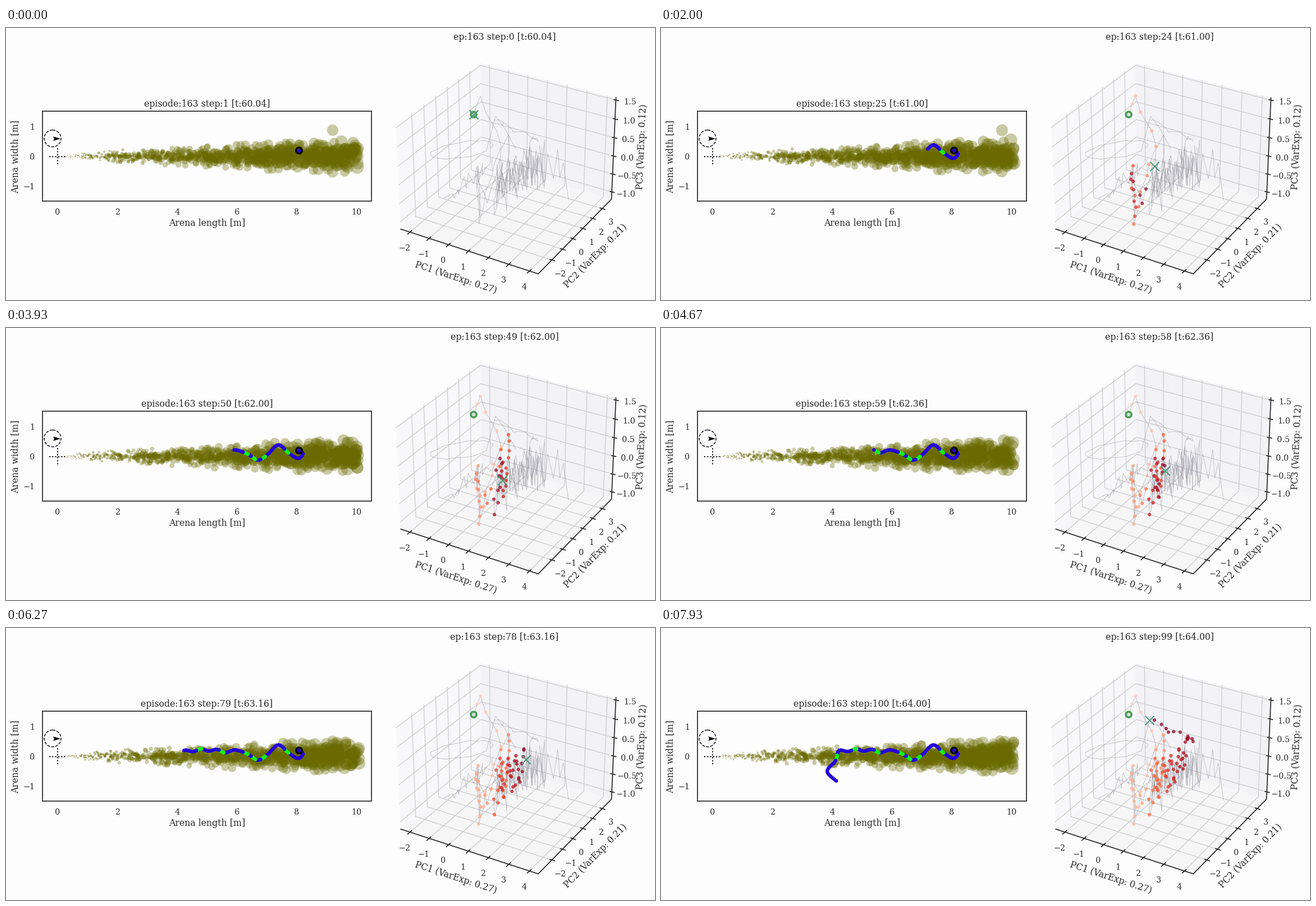
Recreate the animation shown at these times as a matplotlib script. Size 1156 by 484 pixels, loop 8 s.

```python
import math

import numpy as np
import matplotlib.pyplot as plt
from matplotlib.animation import FuncAnimation
from matplotlib.colors import LinearSegmentedColormap
from matplotlib.patches import Circle, Polygon, Rectangle

W, H, DPI = 1156, 484, 100
FRAMES, INTERVAL = 160, 50
PT = 72 / DPI
INK = "#262626"
LABEL, TICK = 15.7, 14.3
UNIT = 53.3                      # pixels per metre in the arena
ORIGIN = np.array([91.5, 228.4])
WIND = 0.5
STEPS = np.arange(100)

plt.rcParams["font.family"] = "DejaVu Serif"
rng = np.random.default_rng(163)
fig = plt.figure(figsize=(W / DPI, H / DPI), dpi=DPI, facecolor="#fdfdfd")
ax = fig.add_axes([0, 0, 1, 1])
ax.set_xlim(0, W)
ax.set_ylim(H, 0)
ax.axis("off")


def text(x, y, s, size=LABEL, **kw):
    kw = {"ha": "center", "va": "center", "color": INK, **kw}
    return ax.text(x, y, s, fontsize=size * PT, **kw)


def number(x, y, s, **kw):
    return text(x, y, str(s).replace("-", "\u2212"), TICK, va="center_baseline", **kw)


def line(points, color=INK, width=1.7, **kw):
    return ax.plot(*np.transpose(points), color=color, lw=width * PT, **kw)[0]


def area(radius):
    """Scatter size of a disc with the given pixel radius."""
    return (2 * np.asarray(radius) * PT) ** 2


# ---- arena ---------------------------------------------------------------
ax.add_patch(Rectangle((64.7, 148.2), 11 * UNIT, 3 * UNIT, fill=False,
                       ec=INK, lw=1.7 * PT, zorder=8))
for v in range(0, 11, 2):
    number(ORIGIN[0] + v * UNIT, 327, v)
for v in (-1, 0, 1):
    number(51.5, ORIGIN[1] - v * UNIT, v, ha="right")
text(358, 347, "Arena length [m]")
text(17, 228.5, "Arena width [m]", rotation=90)
arena_title = text(358, 135.5, "")

line([(76.5, 229), (107, 229)], "black", 2, ls=":", zorder=7)
line([(91.5, 214), (91.5, 246)], "black", 2, ls=":", zorder=7)
ax.add_patch(Circle((83, 196.5), 15, fill=False, ec="#05051e", lw=1.4 * PT, ls="--", zorder=7))
ax.add_patch(Polygon([(84, 193), (97, 197), (84, 201), (86, 197)], fc="black", zorder=7))

# ---- odour puffs ---------------------------------------------------------
N = 1080
puff_x = np.append(rng.uniform(-2.1, 10.05, N), 9.2)
puff_z = np.append(rng.normal(0, 1, N).clip(-2.4, 2.4), -4.1)   # last one strays
puff_size = rng.uniform(0.8, 1.12, N + 1)
puff_phase = rng.uniform(0, 2 * math.pi, N + 1)
plume = ax.scatter([], [], color="#6a6a00", alpha=0.35, linewidths=0, zorder=2)


def draw_plume(elapsed):
    x = puff_x + WIND * elapsed
    seen = (x > 0.02) & (x < 10.08)
    x = x[seen]
    wobble = 0.15 * np.sin(puff_phase[seen] + 1.5 * elapsed)
    y = 2.9 * x ** 0.6 * (puff_z[seen] + wobble)
    plume.set_offsets(np.column_stack([ORIGIN[0] + x * UNIT, ORIGIN[1] + y]))
    plume.set_sizes(area(1.6 * x ** 0.83 * puff_size[seen]))


# ---- flight path ---------------------------------------------------------
def smooth(keys, per_span=12):
    """Catmull-Rom curve through the key points."""
    p = np.array([keys[0], *keys, keys[-1]], float)
    t = np.linspace(0, 1, per_span, endpoint=False)[:, None]
    spans = [b + t / 2 * (c - a + t * (2 * a - 5 * b + 4 * c - d + t * (3 * (b - c) + d - a)))
             for a, b, c, d in zip(p, p[1:], p[2:], p[3:])]
    return np.vstack([*spans, p[-1:]])


def even_steps(curve):
    """Resample a curve at constant speed, one point per step."""
    arc = np.append(0, np.cumsum(np.hypot(*np.diff(curve, axis=0).T)))
    at = arc[-1] * STEPS / STEPS[-1]
    return np.column_stack([np.interp(at, arc, c) for c in curve.T])


flight = even_steps(smooth([
    (522, 218), (529, 224), (520, 232), (503, 222), (485, 208), (466, 225), (449, 235),
    (430, 224), (408, 217), (390, 222), (376, 216), (361, 219), (347, 215), (333, 220),
    (317, 218), (311, 236), (296, 255), (312, 272)]))
whiffs = np.array([14, 31, 37, 42, 56, 69, 82])
on_scent = np.abs(STEPS[:, None] - whiffs).min(axis=1) <= 1
flight_colors = np.where(on_scent, "#0cf51a", "#2400d8")
trail = ax.scatter([], [], s=area(3.3), linewidths=0, zorder=5)
ax.add_patch(Circle(flight[0], 5.2, fill=False, ec="black", lw=3.5 * PT, zorder=6))

# ---- 3D box: perspective camera at elevation 30, azimuth -60 --------------
ELEV, AZIM, DISTANCE, ZOOM = math.radians(30), math.radians(-60), 10, 2455
BOX = np.array([8, 8, 6]) / 7
CENTRE = np.array([894.2, 241.5])
TOWARDS = np.array([math.cos(ELEV) * math.cos(AZIM), math.cos(ELEV) * math.sin(AZIM),
                    math.sin(ELEV)])
RIGHT = np.array([-math.sin(AZIM), math.cos(AZIM), 0])
DOWN = np.cross(RIGHT, TOWARDS)


def project(u, s, w):
    """Box fractions (right, towards viewer, up) to pixels."""
    p = (np.array([u, 1 - s, w]) - 0.5) * BOX
    return CENTRE + ZOOM * np.array([RIGHT @ p, DOWN @ p]) / (DISTANCE - TOWARDS @ p)


def corners(*triples):
    return [project(*t) for t in triples]


for shade, pane in [("#f8f8fa", corners((0, 0, 0), (0, 1, 0), (0, 1, 1), (0, 0, 1))),
                    ("#f3f3f6", corners((0, 0, 0), (1, 0, 0), (1, 0, 1), (0, 0, 1))),
                    ("#f6f6f7", corners((0, 0, 0), (1, 0, 0), (1, 1, 0), (0, 1, 0)))]:
    ax.add_patch(Polygon(pane, fc=shade, zorder=1))


def tick(at, stroke, label, offset):
    stroke = np.array(stroke)
    line([at - 0.7 * stroke, at + stroke], zorder=3)
    number(*(at + offset), label)


def grid(*triples):
    line(corners(*triples), "#cdcdcf", 1.3, zorder=1.5)


for k in range(-2, 5):
    u = 0.07 + 0.1449 * (k + 2)
    grid((u, 1, 0), (u, 0, 0), (u, 0, 1))
    tick(project(u, 1, 0), (-4, 3.5), k, (-9.5, 27))
for k in range(-2, 4):
    s = 0.137 + 0.138 * (3 - k)
    grid((1, s, 0), (0, s, 0), (0, s, 1))
    tick(project(1, s, 0), (5, 1.6), k, (15, 23.5))
for k in np.arange(-1, 1.6, 0.5):
    w = 0.074 + 0.362 * (k + 1)
    grid((0, 1, w), (0, 0, w), (1, 0, w))
    tick(project(1, 0, w), (4.5, 1), f"{k:.1f}", (25, 2.5))
line(corners((0, 1, 0), (1, 1, 0), (1, 0, 0), (1, 0, 1)), zorder=3)

text(801, 444, "PC1 (VarExp: 0.27)", rotation=-18)
text(1050.5, 405.5, "PC2 (VarExp: 0.21)", rotation=45.5)
text(1133, 211, "PC3 (VarExp: 0.12)", rotation=87.5)
state_title = text(888, 16.5, "")

# ---- neural state track --------------------------------------------------
# Turning points (step, x, y): a plunge, a regular shrinking zigzag, an escape.
plunge = [(0, 833, 154), (2, 845, 121), (5, 882, 211), (10, 842, 349), (12, 841, 245),
          (14, 844, 335), (19, 838, 259), (22, 857, 312), (26, 895, 190), (34, 886, 300),
          (38, 885, 239), (42, 870, 332)]
zigzag = [(46 + 5 * i, 880 + 7.1 * i, 268 - 0.8 * i * i - (-1) ** i * (36 - 2 * i))
          for i in range(9)]
escape = [(91, 946, 197), (99, 870, 164)]
turns = np.array(plunge + zigzag + escape)
state = np.column_stack([np.interp(STEPS, turns[:, 0], c) for c in turns.T[1:]])
between = ~np.isin(STEPS, turns[:, 0])
state[between] += rng.uniform(-5, 5, (between.sum(), 2))


def thread(points):
    line(points, "#82828c", 0.8, alpha=0.5, zorder=3.5)


def scribble(start, end, count, swing):
    """Random zigzag about the line from start to end."""
    points = np.linspace(start, end, count) + rng.uniform(-5, 5, (count, 2))
    points[:, 1] += (-1) ** np.arange(count) * rng.uniform(0.15, 1, count) * swing
    thread(points)


thread(state)
scribble((872, 285), (957, 238), 62, 46)
scribble((957, 238), (875, 272), 18, 25)
scribble((785, 302), (868, 242), 16, 17)
scribble((952, 250), (998, 250), 9, 62)
turn = np.linspace(-0.4, 5.6, 22)
loop_x = 812 + 56 * np.cos(turn)
loop_y = 216 - 0.15 * (loop_x - 812) - 14 * np.sin(turn) + rng.uniform(-2, 2, 22)
thread([*zip(loop_x, loop_y), (872, 157), (888, 178), (908, 215)])

heat = LinearSegmentedColormap.from_list(
    "heat", ["#ffd2c6", "#ff9f78", "#fa5a32", "#c81822", "#8c0a30"])
dots = ax.scatter([], [], s=area(3.1), linewidths=0, alpha=0.78, zorder=5)
ax.add_patch(Circle(state[0], 5, fc="#d8e2da", ec="#4f9d5a", lw=3.6 * PT, zorder=6))
cross = ax.scatter([], [], s=area(8), marker="x", color="#459a78", linewidths=1.9 * PT, zorder=7)


def update(frame):
    # Steps advance every 80 ms, seen through a 15 Hz display.
    shown = math.floor(frame * INTERVAL * 0.015 + 0.5)
    step = min(99, max(0, math.ceil(shown * 5 / 6 - 1e-9) - 1))
    clock = f"[t:{60.04 + 0.04 * step:.2f}]"
    arena_title.set_text(f"episode:163 step:{step + 1} {clock}")
    state_title.set_text(f"ep:163 step:{step} {clock}")
    draw_plume(0.04 * step)
    trail.set_offsets(flight[:step + 1])
    trail.set_facecolor(flight_colors[:step + 1])
    past = STEPS[1:max(step, 1)]
    dots.set_offsets(state[past])
    dots.set_facecolor(heat(past / max(step, 1)))
    cross.set_offsets(state[step:step + 1])
    return plume, trail, dots, cross, arena_title, state_title


anim = FuncAnimation(fig, update, frames=FRAMES, interval=INTERVAL, repeat=True, repeat_delay=0)
plt.show()
```
